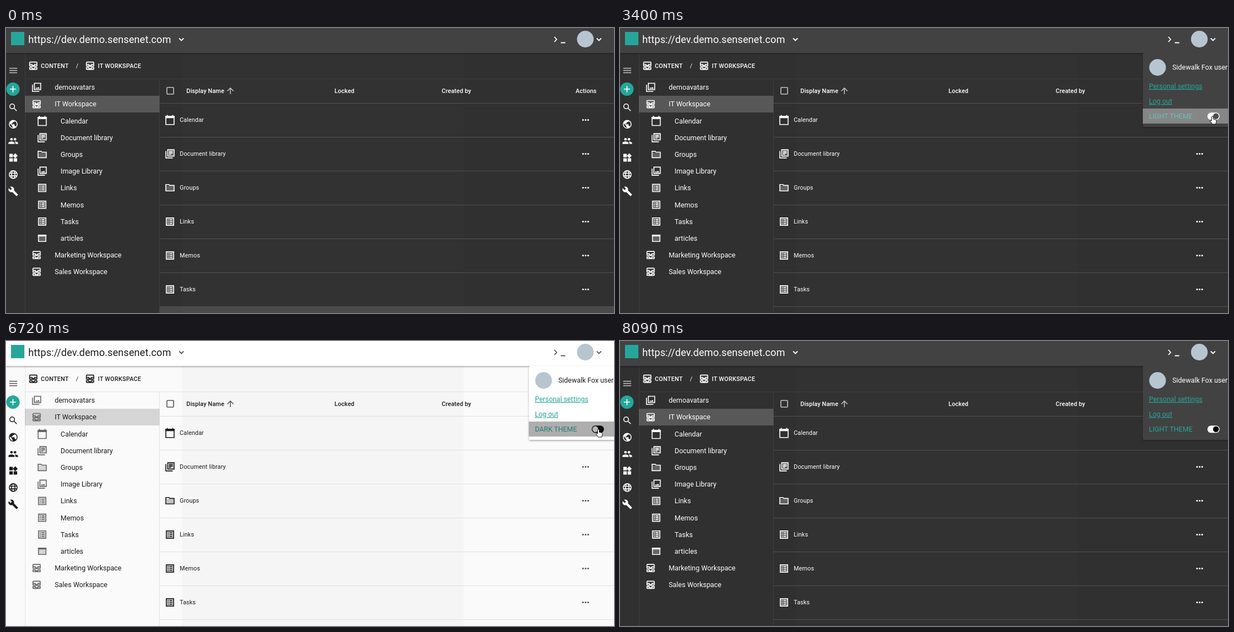
Recreate the animation shown at these times as an HTML page. Size 1092 by 513 pixels, loop 8570 ms.

```html
<!DOCTYPE html>
<html lang="en">
<head>
<meta charset="utf-8">
<title>Theme switch</title>
<style>
html, body { margin: 0; width: 100%; height: 100%; overflow: hidden; }
svg {
  display: block; font-family: Roboto, Arial, sans-serif; fill: var(--fg); background: var(--page);
  --page: #303030; --bar: #424242; --fg: #fff; --side: #fff; --soft: #c4c4c4; --dots: #fff;
  --line: #515151; --edge: #3e3e3e; --mark: .012; --tint: .12;
}
svg.light {
  --page: #fafafa; --bar: #fff; --fg: #1c1c1c; --side: #666; --soft: #555; --dots: #5a5a5a;
  --line: #e0e0e0; --edge: #e2e2e2; --mark: .018; --tint: .06;
}
.bar { fill: var(--bar); }
.side { color: var(--side); }
.table, .rail { color: var(--fg); }
.soft { color: var(--soft); }
.header { color: var(--dots); }
.icon { fill: none; stroke: currentColor; stroke-width: 2; }
.icon .solid { fill: currentColor; stroke: none; }
.icon .tint { fill: currentColor; stroke: none; opacity: .25; }
.line { stroke: var(--line); }
.edge { stroke: var(--edge); }
.teal { fill: #26a69a; }
.link { text-decoration: underline; }
.bold { font-weight: 500; }
.caps { font-weight: 500; letter-spacing: .0286em; }
.body { letter-spacing: .0107em; }
.url { letter-spacing: .0075em; }
</style>
</head>
<body>
<svg id="stage" width="1092" height="513" viewBox="0 0 1092 513"></svg>
<script>
const stage = document.getElementById('stage');
const LOOP = 8570, TO_LIGHT = 3790, TO_DARK = 7100;

// Icons on a 24 unit grid, made of strokes, solid parts and translucent fills.
const pen = d => `<path d="${d}"/>`;
const solid = d => `<path class="solid" fill-rule="evenodd" d="${d}"/>`;
const tint = d => `<path class="tint" d="${d}"/>`;
const stack = pen('M7 3h14v14H7zM3 6v15h15');
const ICONS = {
  menu: pen('M3 7h18M3 12h18M3 17h18'),
  search: '<circle cx="9.5" cy="9.5" r="5.5"/>' + pen('M14 14l6 6'),
  earth: solid('M12 2a10 10 0 1 0 0 20 10 10 0 0 0 0-20zM11 19.930c-3.950-.49-7-3.850-7-7.930q0-.9.2-1.800L9 15v1q0 2 2 2z'
    + 'M17.900 17.400q-.5-1.400-1.900-1.400h-1v-3q0-1-1-1H8v-2h2q1 0 1-1V7h2q2 0 2-2v-.4c5 2 6.700 8.500 2.900 12.800z'),
  people: '<g class="solid"><circle cx="8" cy="8" r="3"/><circle cx="16" cy="8" r="3"/></g>'
    + solid('M8 13c-2.300 0-7 1.200-7 3.500V19h14v-2.500C15 14.200 10.300 13 8 13zM16 13l-1 .1q2 1.400 2 3.400V19h6v-2.500c0-2.300-4.700-3.500-7-3.500z'),
  widgets: solid('M13 13h8v8h-8zM3 13h8v8H3zM3 3h8v8H3zM16.700 1.700l5.600 5.600-5.600 5.700L11 7.300z'),
  globe: '<circle cx="12" cy="12" r="9"/><ellipse cx="12" cy="12" rx="4" ry="9"/>' + pen('M4 9h16M4 15h16'),
  build: solid('M22.700 19l-9.100-9.100c.9-2.300.4-5-1.500-6.900-2-2-5-2.400-7.400-1.300L9 6 6 9 1.600 4.700C.4 7.100.9 10.100 2.900 12.100c1.900 1.900 4.600 2.400 6.900 1.500l9.100 9.100q.7.6 1.400 0l2.300-2.300q.7-.7.1-1.400z'),
  space: tint('M5 9h14v3H5zM5 16h14v3H5z')
    + solid('M5 3h14q2 0 2 2v7q0 2-2 2H5q-2 0-2-2V5q0-2 2-2zM5 10v2h4.400q-1-.8-1.300-2zM19 12v-2h-3.100q-.4 1.200-1.300 2zM19 8V5H5v3h5v1a2 2 0 0 0 4 0V8z')
    + solid('M14 15v1a2 2 0 0 1-4 0v-1H3v4q0 2 2 2h14q2 0 2-2v-4zM5 17v2h4.400q-1-.8-1.300-2zM19 19v-2h-3.100q-.4 1.200-1.300 2z'),
  images: stack + solid('M9 15l2.500-3.300 1.700 2.200 2.500-3.100L19 15z'),
  docs: stack + tint('M8 4h12v12H8z') + pen('M10 7h8M10 10h8M10 13h4'),
  calendar: pen('M3 4h18v18H3zM6 1v3M18 1v3') + solid('M2 3h20v5H2z'),
  folder: pen('M3 5h6.600l2 2H21v12H3z') + tint('M4 8h16v10H4z'),
  list: pen('M4 4h16v16H4zM7 8h2M7 12h2M7 16h2M11 8h6M11 12h6M11 16h6') + tint('M5 5h14v14H5z'),
  page: pen('M4 5h16v14H4z') + solid('M3 4h18v4H3z') + tint('M5 8h14v10H5z')
};

const icon = (name, x, y, scale = .82) =>
  `<g class="icon" transform="translate(${x} ${y}) scale(${scale}) translate(-12 -12)">${ICONS[name]}</g>`;
const text = (x, y, str, size = 12.4, cls = '') =>
  `<text x="${x}" y="${y + size * .355}" font-size="${size}" class="${cls}">${str}</text>`;
const rect = (x, y, w, h, more = '') => `<rect x="${x}" y="${y}" width="${w}" height="${h}" ${more}/>`;
const line = (d, cls = 'line') => `<path class="${cls}" d="${d}"/>`;
const chevron = x => `<path class="icon" style="stroke-width:1.8" d="M${x - 4} 18.500l4 4 4-4"/>`;
const avatar = (x, y) => `<circle cx="${x}" cy="${y}" r="15" fill="#b7c5d1"/>`;

const rail = ['search', 'earth', 'people', 'widgets', 'globe', 'build'];
const tree = [
  ['images', 'demoavatars', 0], ['space', 'IT Workspace', 0], ['calendar', 'Calendar', 1],
  ['docs', 'Document library', 1], ['folder', 'Groups', 1], ['images', 'Image Library', 1],
  ['list', 'Links', 1], ['list', 'Memos', 1], ['list', 'Tasks', 1], ['page', 'articles', 1],
  ['space', 'Marketing Workspace', 0], ['space', 'Sales Workspace', 0]
];
const rows = [2, 3, 4, 6, 7, 8].map(i => tree[i]);
const heads = [[324, 'Display Name'], [590, 'Locked'], [782.5, 'Created by'], [1023, 'Actions']];

// Menu rows: top, height, pointer enters, pointer leaves
const menuRows = [[46, 45, 1640, 1985], [91, 27, 1985, 2155], [118, 27, 2155, 2355], [145, 27, 2355, 7490]];

const railPart = `<g class="soft">${icon('menu', 13, 76.5, .79)}</g>
  <circle class="teal" cx="12.5" cy="110" r="12"/>
  <path d="M7 110h11M12.500 104.500v11" stroke="#fff" stroke-width="1.7"/>
  <g class="rail">${rail.map((name, i) => icon(name, 13, 143 + i * 30.2, .78)).join('')}</g>`;

const treePart = rect(34, 122, 241.5, 30, 'id="chosen"') + '<g class="side">'
  + tree.map(([name, label, deep], i) => {
    const y = 106.9 + i * 30.18;
    return icon(name, deep ? 65 : 55, y) + text(deep ? 98.1 : 87.5, y, label);
  }).join('') + '</g>';

const crumbs = `<g class="rail">${icon('space', 49, 68)}${icon('space', 151, 68)}</g>`
  + text(62.5, 68, 'CONTENT', 10.7, 'caps') + text(125.5, 68, '/', 11) + text(165, 68, 'IT WORKSPACE', 10.7, 'caps');

const tablePart = rect(276, 440, 816, 61, 'id="lastRow"') + rect(276, 501, 816, 12, 'id="nextRow"')
  + `<g class="soft">${rect(289, 107, 12, 12, 'rx="1" class="icon" style="stroke-width:1.6"')}
    <path class="icon" style="stroke-width:1.5" d="M403 119v-11M397.500 113.500l5.500-5.500 5.500 5.500"/></g>`
  + heads.map(([x, label]) => text(x, 113, label, 10.8, 'bold body')).join('')
  + '<g class="table">' + rows.map(([name, label], i) => {
    const y = 165.5 + i * 61;
    const dots = [-4.6, 0, 4.6].map(d => `<circle cx="${1041 + d}" cy="${y}" r="1.6" style="fill:var(--dots)"/>`).join('');
    return icon(name, 294.5, y) + text(312, y - .5, label, 10.7, 'body') + dots;
  }).join('') + '</g>'
  + [...Array(7).keys()].map(i => line(`M276 ${135 + i * 61}.500H1092`)).join('');

const headerPart = rect(0, 0, 1092, 45, 'class="bar" filter="url(#shade)"')
  + rect(9, 7, 24, 24, 'fill="#26a69a"')
  + text(40, 21, 'https://dev.demo.sensenet.com', 17.9, 'url')
  + `<g class="header">${chevron(315)}${chevron(1065)}
    <path class="icon" style="stroke-width:1.8" d="M985 16l4 4.500-4 4.500M996.500 26.500h8"/></g>` + avatar(1040.5, 20);

const menuPart = '<g id="menu">' + rect(939, 45, 160, 133, 'rx="3" class="bar" filter="url(#shade)"')
  + menuRows.map(([y, h]) => rect(939, y, 153, h, 'class="hover"')).join('')
  + avatar(965.5, 71) + text(992, 71, 'Sidewalk Fox user')
  + text(950, 104.5, 'Personal settings', 12.4, 'teal link') + text(950, 131.7, 'Log out', 12.4, 'teal link')
  + text(950, 158.8, '', 12.4, 'teal mode')
  + `<g id="toggle">${rect(0, 152.3, 22, 13, 'rx="6.5" id="pill"')}<circle id="knob" cy="158.8" r="5.2"/></g>
    <circle id="ripple" cx="1064" cy="159" clip-path="url(#modeRow)"/></g>`;

stage.innerHTML = `<defs>
    <filter id="shade" x="-10%" y="-20%" width="120%" height="150%">
      <feDropShadow dx="0" dy="1.5" stdDeviation="1.8" flood-opacity=".35"/></filter>
    <clipPath id="modeRow">${rect(939, 145, 153, 27)}</clipPath>
  </defs>`
  + rect(316, 45, 506, 506, 'style="opacity:var(--mark)"')
  + line('M34.500 45V513M34 91.500H1092M275.500 92V513', 'edge')
  + railPart + crumbs + treePart + tablePart + headerPart + menuPart
  + `<circle id="press" r="8.8" fill="#ff0" fill-opacity=".52"/>
    <path id="hand" fill="#fff" stroke="#000" stroke-width=".9"
      d="M-1.500 8V1.300a1.500 1.500 0 0 1 3 0V5l4 1q2 .5 1.700 2.800L6 14H0l-4-5q-.6-1.800 1-2z"/>`;

const el = id => document.getElementById(id);
const set = (node, attrs) => Object.entries(attrs).forEach(([key, value]) => node.setAttribute(key, value));
const hovers = [...document.querySelectorAll('.hover')];
const mode = document.querySelector('.mode');

const ramp = (t, start, span) => Math.min(1, Math.max(0, (t - start) / span));
const pulse = (t, from, to, span = 150) => ramp(t, from, span) - ramp(t, to, span);
const ease = p => p * p * (3 - 2 * p);
const within = (t, from, to) => t >= from && t < to;

const path = [[530, 1066, 15], [610, 1065, 17], [680, 1063, 17], [1450, 1063, 17], [1610, 1054, 55],
  [1760, 1054, 55], [1910, 1048, 79], [1990, 1050, 92], [2200, 1056, 125], [2460, 1064, 159]];
function pointer(t) {
  const next = path.findIndex(p => p[0] > t);
  if (next < 0) return path[path.length - 1].slice(1);
  const a = path[Math.max(0, next - 1)], b = path[next];
  const p = ramp(t, a[0], b[0] - a[0] || 1);
  return [a[1] + (b[1] - a[1]) * p, a[2] + (b[2] - a[2]) * p];
}

function draw(t) {
  const light = within(t, TO_LIGHT, TO_DARK);
  const blend = pulse(t, TO_LIGHT, TO_DARK, 250);
  stage.classList.toggle('light', light);

  // Selected row and switch fade between the themes, everything else jumps.
  const white = .193 * (1 - blend), black = .15 * blend;
  const grey = 255 * white / (white + black);
  set(el('chosen'), { fill: `rgba(${grey},${grey},${grey},${white + black})` });
  const pill = 255 * (1 - blend);
  set(el('pill'), { fill: `rgb(${pill},${pill},${pill})` });
  set(el('knob'), { cx: light ? 6.5 : 15.3, fill: light ? '#fff' : '#000' });
  set(el('toggle'), { transform: `translate(${light ? 1052 : 1055} 0)` });
  mode.textContent = light ? 'DARK THEME' : 'LIGHT THEME';

  set(el('menu'), { opacity: t < 1220 ? 0 : ease(ramp(t, 1160, 330)) });
  hovers.forEach((node, i) => set(node, { opacity: .08 * pulse(t, menuRows[i][2], menuRows[i][3], 200) }));

  const [start, end] = t < 6180 ? [2860, TO_LIGHT] : [6180, TO_DARK];
  const grow = ease(ramp(t, start, 540));
  set(el('ripple'), { r: 128 * grow, opacity: (.1 + .2 * grow) * (1 - ramp(t, end, 250)) });

  el('lastRow').style.opacity = `calc(var(--tint) * ${pulse(t, 7820, 7990, 100)})`;
  el('nextRow').style.opacity = t < 70 ? 'var(--tint)' : 0;

  const [x, y] = pointer(t);
  set(el('hand'), { transform: `translate(${x} ${y})`, opacity: +within(t, 530, 7490) });
  const pressed = [980, 2860, 6180].some(at => within(t, at, at + 95));
  set(el('press'), { cx: x, cy: y, opacity: +pressed });
}

const begin = performance.now();
function tick() {
  draw((performance.now() - begin) % LOOP);
  requestAnimationFrame(tick);
}
tick();
</script>
</body>
</html>
```
